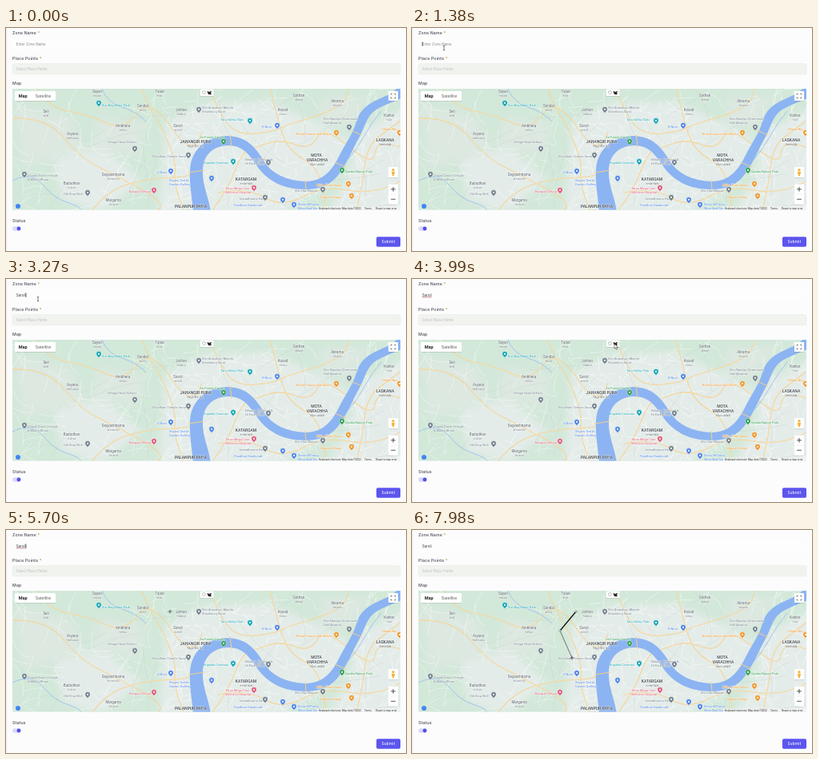
An HTML page that plays this animation: 500x279 px, repeating every 8000 ms.

```html
<!DOCTYPE html>
<html lang="en">
<head>
<meta charset="utf-8">
<title>Add zone</title>
<style>
html, body { margin: 0; width: 100%; height: 100%; overflow: hidden; background: #fcfcfd; }
svg { display: block; width: 100%; height: 100%; }
text { font-family: Inter, Roboto, sans-serif; }
.map text { font-family: Roboto, "Noto Sans", sans-serif; }
.place text, .poi text { stroke: #fff; stroke-opacity: .7; stroke-width: .8; paint-order: stroke; stroke-linejoin: round; }
</style>
</head>
<body>
<svg id="stage" viewBox="0 0 500 279" preserveAspectRatio="none">
  <defs>
    <clipPath id="mapClip"><rect x="8" y="76" width="485" height="151.5"/></clipPath>
    <filter id="soft"><feGaussianBlur stdDeviation="5"/></filter>
    <filter id="lift" x="-20%" y="-30%" width="140%" height="170%">
      <feDropShadow dx="0" dy=".4" stdDeviation=".5" flood-opacity=".25"/>
    </filter>
    <path id="pin" d="M0 4C-.5 2-3.2 1-3.2-1.2a3.2 3.2 0 0 1 6.4 0C3.2 1 .5 2 0 4Z"/>
  </defs>
  <rect width="500" height="279" fill="#fcfcfd"/>
  <rect width="1.2" height="279" fill="#eeeef1"/>
  <g font-size="5.2" font-weight="500" fill="#4a4a55" letter-spacing=".15">
    <text x="8" y="8.4">Zone Name <tspan fill="#c9862f">*</tspan></text>
    <text x="8" y="39.8">Place Points <tspan fill="#c9862f">*</tspan></text>
    <text x="8" y="71.2">Map</text>
    <text x="8" y="243.2">Status</text>
  </g>
  <rect x="8" y="13" width="485" height="14" rx="2" fill="#fdfdfe"/>
  <rect x="8" y="44.5" width="485" height="13.5" rx="2" fill="#f1f3ee" stroke="#e9ebe6" stroke-width=".5"/>
  <text x="12.7" y="52.8" font-size="4.3" fill="#b9bbc0">Select Place Points</text>
  <text id="hint" x="12.7" y="21.6" font-size="4.5" fill="#85878e">Enter Zone Name</text>
  <text id="value" x="12.7" y="21.6" font-size="4.5" fill="#34343c"></text>
  <path id="spell" stroke="#b4514e" stroke-width=".6"/>
  <path id="caret" stroke="#222" stroke-width=".7"/>

  <g class="map" clip-path="url(#mapClip)">
    <rect x="8" y="76" width="485" height="152" fill="#d2e8d9"/>
    <g id="land" filter="url(#soft)"></g>
    <g id="streets" fill="none" stroke="#fff"></g>
    <g id="roads" fill="none" stroke-linejoin="round"></g>
    <g id="river"></g>
    <g id="bridges" fill="none" stroke="#f3d08d" stroke-width="1"></g>
    <g id="places" class="place" text-anchor="middle"></g>
    <g id="pois" class="poi"></g>

    <circle cx="15" cy="223" r="3" fill="#4285f4"/>
    <rect x="389" y="223.3" width="104" height="5" fill="#f5f5f5" opacity=".8"/>
    <g font-size="3.2" fill="#333">
      <text x="391" y="226.6">Keyboard shortcuts</text>
      <text x="420" y="226.6">Map data ©2022</text>
      <text x="448" y="226.6">Terms</text>
      <text x="462" y="226.6">Report a map error</text>
    </g>
    <g filter="url(#lift)" fill="#fff">
      <rect x="11" y="79" width="51" height="12" rx=".7"/>
      <rect x="243" y="76.5" width="16.5" height="8.6" rx=".6"/>
      <rect x="478" y="79" width="12" height="12" rx=".7"/>
      <rect x="478" y="174" width="12" height="13" rx=".7"/>
      <rect x="478" y="195.5" width="12" height="25" rx=".7"/>
    </g>
    <text x="15.8" y="87" font-size="5.5" font-weight="700" fill="#222">Map</text>
    <text x="36.7" y="87" font-size="5.4" fill="#666">Satellite</text>
    <path d="M245.5 80.5v-1q.4-1.3 1-.4.4-1.3 1-.2.6-.9 1 .2.7-.5.7.5v1.5q-.2 1.7-1.7 1.7t-2-2.3" fill="none" stroke="#888" stroke-width=".5"/>
    <path d="M251.8 79.3l2.2 1 2.6-1.1-.8 2 .6 1.8-3.4-.3Z" fill="#222" stroke="#222" stroke-width=".6"/>
    <path d="M481.2 83.7v-1.5h1.5M485.3 82.2h1.5v1.5M486.8 86.3v1.5h-1.5M482.7 87.8h-1.5v-1.5" fill="none" stroke="#666" stroke-width=".9"/>
    <circle cx="484" cy="177.8" r="1.7" fill="#f3b43c"/>
    <path d="M481.9 180h4.2l-.5 3h-.5l-.3 2.3h-1.6l-.3-2.3h-.5Z" fill="#f3b43c"/>
    <path d="M481.2 201.7h5.6M484 198.9v5.6M481.2 214.3h5.6" stroke="#555" stroke-width="1.1"/>
    <path d="M480 208h8" stroke="#e2e2e2" stroke-width=".5"/>
    <g id="shape" fill="none" stroke-linecap="round"></g>
  </g>

  <rect x="8" y="248.2" width="11" height="5.6" rx="2.8" fill="#d9d8fa"/>
  <circle cx="15.9" cy="251" r="2.4" fill="#5450e6"/>
  <rect x="463" y="261.3" width="30" height="12.5" rx="1.8" fill="#5b55ed"/>
  <text x="478" y="269.2" font-size="4.6" font-weight="500" fill="#fff" text-anchor="middle" letter-spacing=".3">Submit</text>
  <g id="cursor"></g>
</svg>
<script>
const LOOP = 8000;
const $ = id => document.getElementById(id);
const path = (d, attrs = "") => `<path d="${d}" ${attrs}/>`;

// Urban areas
$("land").innerHTML = [
  "M200 120L245 95 330 92 390 120 430 140 410 190 330 240 190 240Z",
  "M440 130L500 100V235H400L430 180Z",
  "M60 165L120 150 170 190 120 230 70 215Z"
].map(d => path(d, 'fill="#e4ece9"')).join("")
  + path("M395 85h60l-25 40-40-5ZM10 95l70 15 20 45-80 20ZM115 110l60 10-10 40-60-8Z", 'fill="#dce8e0"');

let seed = 17;
const rand = () => (seed = seed * 16807 % 2147483647) / 2147483647;
function street(x0, span, reach, bend) {
  const x = x0 + rand() * span, y = 76 + rand() * 152, a = rand() * 6.283;
  const l = reach * (.4 + rand()), b = (rand() - .5) * bend;
  const dx = Math.cos(a) * l, dy = Math.sin(a) * l;
  return `M${x.toFixed(1)} ${y.toFixed(1)}q${(dx / 2 + b).toFixed(1)} ${(dy / 2 - b).toFixed(1)} ${dx.toFixed(1)} ${dy.toFixed(1)}`;
}
const streets = (n, ...args) => Array.from({ length: n }, () => street(...args)).join("");
$("streets").innerHTML =
  path(streets(75, 8, 210, 32, 18), 'stroke-width=".5" opacity=".75"') +
  path(streets(230, 195, 300, 18, 6), 'stroke-width=".55" opacity=".8"') +
  path(streets(22, 8, 485, 60, 25), 'stroke="#c9d6d2" stroke-width=".5"');

const highways = "M8 113Q50 111 72 137T112 172 166 200 190 228"
  + "M38 76Q52 99 78 104T126 119 164 107 207 125 245 130"
  + "M170 76Q177 96 187 112T205 149 211 182 222 228"
  + "M108 228Q126 204 151 196T207 187 230 178"
  + "M255 76Q264 100 275 117T310 132 341 126 388 110 428 76"
  + "M330 76Q337 103 344 128T372 164 397 208 407 228"
  + "M258 228Q277 203 286 179T304 152 328 144 362 146 389 137 428 148 461 157 493 149"
  + "M438 228Q445 200 448 174T465 137 493 116"
  + "M265 206Q301 199 323 212T371 211 429 203 493 192";
$("roads").innerHTML = path(highways, 'stroke="#efcb8b" stroke-width="1.1"')
  + path(highways, 'stroke="#fae6ba" stroke-width=".6"');

// River: outer bank, then back along the inner bank
$("river").innerHTML =
  path("M234 230C232 208 229 194 230 178C231 153 249 136 276 135C300 135 312 149 322 166C332 182 350 191 374 192"
    + "C397 192 408 177 416 161C425 143 434 132 438 117C442 103 452 95 466 89C480 83 486 79 490 74H500V86"
    + "C486 91 474 96 463 102C451 109 449 123 442 136C434 150 430 161 422 174C411 193 398 202 374 202"
    + "C345 202 326 190 314 173C303 157 296 147 277 147C258 148 247 159 246 177C245 196 253 210 256 230Z", 'fill="#8cb4f2"')
  + path("M428 164Q441 148 449 133T469 104M8 191Q32 179 46 196T76 218 94 228M120 76Q126 93 145 99T175 117",
    'fill="none" stroke="#9dc0f2" stroke-width=".9"');
$("bridges").innerHTML = path("M228 181l20-3M280 133l2 16M312 171l12-9M374 190l1 13M411 168l14 6M431 128l14 6");

// [name, x, y, second script]
const towns = [
  ["Sayan", 114, 81, "સાયણ"], ["Talad", 192, 81, "તલાદ"], ["Gothan", 366, 86, "ગોથાણ"],
  ["Jothan", 219, 104, "જોથાણ"], ["Saroli", 215, 124, "સરોલી"], ["Ambheta", 146, 124, "અંભેટા"],
  ["Aryana", 83, 134, "આરિયાણા"], ["Seli", 50, 106, "સેલી"], ["Sondal", 171, 99, "સોંદલ"],
  ["Segvachhama", 134, 185, "સેગવાછમા"], ["Badodhan", 82, 196, "બડોધન"], ["Margama", 134, 217, "મરગામા"],
  ["Kosad", 346, 104, "કોસાડ"], ["Abrama", 414, 93, "અબ્રામા"], ["Kathor", 479, 111, "કઠોર"]
];
const districts = [
  ["JAHANGIR PURA", 237, 144, "જહાંગીર પુરા"], ["KATARGAM", 300, 190.5, "કતારગામ"],
  ["MOTA", 388, 161, ""], ["VARACHHA", 389, 166.5, "મોટા વરાછા"],
  ["LASKANA", 474, 142, "લસકાણા"], ["PALANPUR PATIA", 231, 224.5, "પાલનપુર"]
];
const place = size => ([name, x, y, local]) =>
  `<text x="${x}" y="${y}" font-size="${size}">${name}</text><text x="${x}" y="${y + 5.2}" font-size="${size - .8}">${local}</text>`;
$("places").innerHTML = `<g fill="#59616a">${towns.map(place(4.5)).join("")}</g>`
  + `<g fill="#3f454c" font-weight="500">${districts.map(place(5)).join("")}</g>`;

const tones = { teal: "#12a5b5", grey: "#71808c", green: "#2f9e50", blue: "#4b82e8", orange: "#ef9425", red: "#e4577a" };
// [tone, pin x, pin y, label x, label y, lines]
const pois = [
  ["teal", 116, 95, 120, 98, "Sun Bay Water Park"],
  ["teal", 305, 117, 268, 116, "Taru Valley Club"],
  ["teal", 284, 168, 247, 170, "Rupalok Cinemas"],
  ["grey", 241, 103, 245, 101, "Shri Anandvan Mandir|Shantikunj Surat"],
  ["grey", 161, 152, 127, 144, "Village Head School"],
  ["grey", 228, 160, 183, 162, "Shivdham Temple Surat"],
  ["grey", 23, 184, 27, 186, "Chowk Street Temple|& Mukta Dham"],
  ["grey", 102, 207, 72, 209, "Old Step Well"],
  ["grey", 324, 213, 292, 215, "Indradharma Hall"],
  ["grey", 396, 203, 361, 205, "Shri Hari Mandir"],
  ["grey", 429, 125, 397, 115, "Shri Nandan Community|Hall Abrama"],
  ["green", 272, 143, 242, 138, "Jal Family Garden"],
  ["green", 420, 179, 424, 181, "Vanika Nature Park"],
  ["blue", 339, 123, 320, 125, "K-Nest"],
  ["blue", 206, 180, 189, 182, "V-Nest"],
  ["blue", 257, 189, 204, 192, "Shyam Textile|Garden Gallery"],
  ["blue", 346, 216, 285, 223, "Paridhan Handicraft"],
  ["blue", 360, 222, 365, 222, "Shree M Fancy|Wear And Saree"],
  ["grey", 328, 169, 299, 166, "Nilratna Diamond &|Hi Park Dome"],
  ["orange", 413, 132, 363, 134, "Bhola Chandu Sandwich"],
  ["orange", 428, 196, 388, 198, "Mitho Thali House"],
  ["orange", 432, 211, 393, 213, "Lilapan Village"],
  ["orange", 492, 132, 470, 128, "Dhaba Nilu"],
  ["red", 185, 204, 154, 206, "Banquet Velora"],
  ["red", 310, 201, 274, 202, "Tarun Mega Care|Wellness Hospital"]
];
$("pois").innerHTML = pois.map(([tone, px, py, x, y, label]) => {
  const c = tones[tone];
  const lines = label.split("|").map((s, i) => `<text x="${x}" y="${y + i * 4.6}" font-size="4" fill="${c}">${s}</text>`).join("");
  return `${lines}<use href="#pin" x="${px}" y="${py}" fill="${c}" stroke="#fff" stroke-width=".4"/><circle cx="${px}" cy="${py - 1.2}" r="1.1" fill="#fff"/>`;
}).join("");

// Pointer stops: [ms, x, y]
const stops = [
  [330, 104, 104], [450, 78, 72], [900, 40, 25], [3420, 40, 25], [3900, 253, 81],
  [4200, 253, 81], [4650, 259, 159], [5500, 205, 102], [6200, 205, 102],
  [6750, 195, 127], [7000, 185, 126], [7250, 185, 126], [7980, 200, 160]
];
const ease = u => u * u * (3 - 2 * u);
function pointer(t) {
  const i = stops.findIndex(s => s[0] > t);
  if (i < 1) return stops[i ? stops.length - 1 : 0].slice(1);
  const [a, b] = [stops[i - 1], stops[i]];
  const u = ease((t - a[0]) / (b[0] - a[0]));
  return [a[1] + (b[1] - a[1]) * u, a[2] + (b[2] - a[2]) * u];
}

const arrow = path("M0 0V6.2L1.5 4.9 2.5 7.1 3.5 6.6 2.5 4.5H4.5Z", 'fill="#fff" stroke="#222" stroke-width=".5"');
const beam = path("M-1.2-2.8Q0-2.8 0-2.2 0-2.8 1.2-2.8M0-2.2V2.2M-1.2 2.8Q0 2.8 0 2.2 0 2.8 1.2 2.8", 'fill="none" stroke="#222" stroke-width=".6"');
const cross = path("M-2.6 0H2.6M0-2.6V2.6", 'stroke="#222" stroke-width=".6"');
function cursorArt(x, y) {
  if (y > 12 && y < 28) return beam;
  const onTools = x > 243 && x < 260 && y < 85.5;
  return y > 76 && !onTools ? cross : arrow;
}

const NAME = "Saroli", TYPE_AT = 2050, KEY = 210, TYPED = TYPE_AT + KEY * 5;
const FIRST = [205, 102], SECOND = [185, 126], CLICK1 = 5750, CLICK2 = 7150;

function drawField(t) {
  const count = t < TYPE_AT ? 0 : Math.min(NAME.length, 1 + Math.floor((t - TYPE_AT) / KEY));
  const value = $("value");
  value.textContent = NAME.slice(0, count);
  $("hint").style.display = count ? "none" : "";
  const end = 12.7 + (count ? value.getComputedTextLength() : 0);
  const focused = t > 1000 && t < CLICK1;
  const since = t < TYPE_AT ? t - 1000 : Math.max(0, t - TYPED);
  $("caret").setAttribute("d", focused && since % 1060 < 530 ? `M${end + .3} 17.3V22.8` : "");
  $("spell").setAttribute("d", t > 3800 && t < CLICK1 ? `M12.7 22.9H${end}` : "");
}

function drawShape(t, tip) {
  const line = (a, b, attrs) => path(`M${a}L${b}`, attrs);
  const dot = ([x, y]) => `<circle cx="${x}" cy="${y}" r="1.2" fill="#fff" stroke="#333" stroke-width=".4"/>`;
  const band = 'stroke="#000" stroke-opacity=".5" stroke-width="1"';
  let out = "";
  if (t >= CLICK2) {
    out = line(FIRST, SECOND, 'stroke="#111" stroke-width="1.3"') + line(SECOND, tip, band) + dot(FIRST) + dot(SECOND);
  } else if (t >= CLICK1) {
    out = line(FIRST, tip, band) + dot(FIRST);
  }
  $("shape").innerHTML = out;
}

function render(t) {
  const tip = pointer(t), cursor = $("cursor");
  cursor.innerHTML = t < 390 ? "" : cursorArt(...tip);
  cursor.setAttribute("transform", `translate(${tip})`);
  drawField(t);
  drawShape(t, tip);
}

const start = performance.now();
function tick() {
  render((performance.now() - start) % LOOP);
  requestAnimationFrame(tick);
}
tick();
</script>
</body>
</html>
```
